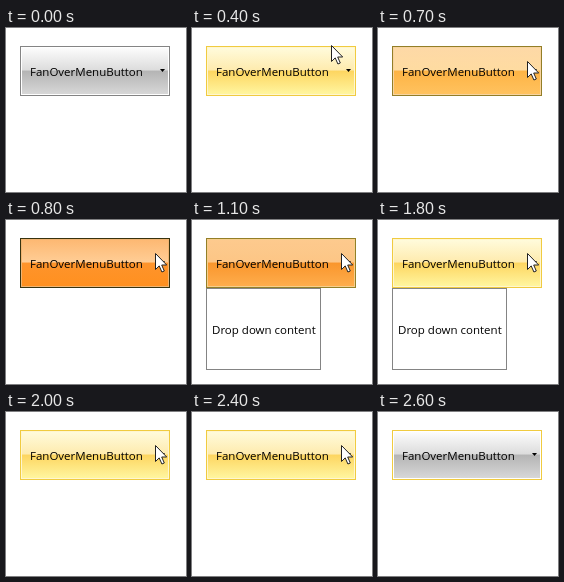
An HTML page for the animation above (3200 ms loop, 180 by 164 pixels).

```html
<!DOCTYPE html>
<html lang="en">
<head>
<meta charset="utf-8">
<title>Drop down button</title>
<style>
  html, body { margin: 0; width: 100%; height: 100%; overflow: hidden; background: #fff; }
  svg { display: block; }
  text { font: 11.5px "Open Sans", "Noto Sans", sans-serif; fill: #000; }
</style>
</head>
<body>
<svg width="180" height="164" viewBox="0 0 180 164">
  <defs id="defs"></defs>
  <g id="skins"></g>
  <rect id="frame" x="14.5" y="18.5" width="149" height="49" fill="none" stroke="#f0cb40"/>
  <text x="24" y="48">FanOverMenuButton</text>
  <path d="M154 41h5l-2.5 3z"/>
  <g id="popup">
    <rect x="14.5" y="68.5" width="114" height="81" fill="#fff" stroke="#848484"/>
    <text x="20" y="114">Drop down content</text>
  </g>
  <path id="cursor" d="M.5 .5V16.5L4.2 12.9 6.9 19 9.3 18 6.7 12H11.7Z" fill="#fff" stroke="#222"/>
</svg>
<script>
const LOOP = 3200, STEP = 100;
const $ = id => document.getElementById(id);

// A glossy face: two gradients that meet in a hard edge near the middle.
function addSkin(name, outer, inner, top, aboveEdge, belowEdge, bottom) {
  $("defs").innerHTML += `<linearGradient id="${name}Fill" x2="0" y2="1">
    <stop stop-color="${top}"/>
    <stop offset=".48" stop-color="${aboveEdge}"/>
    <stop offset=".5" stop-color="${belowEdge}"/>
    <stop offset="1" stop-color="${bottom}"/>
  </linearGradient>`;
  $("skins").innerHTML += `<g id="${name}">
    <rect x="14.5" y="18.5" width="149" height="49" fill="#fff" stroke="${outer}"/>
    <rect x="15.5" y="19.5" width="147" height="47" fill="url(#${name}Fill)" stroke="${inner}"/>
  </g>`;
}

addSkin("normal", "#848484", "#fff", "#fdfdfd", "#dcdcdc", "#b4b4b4", "#d8d8d8");
addSkin("hover", "#f0cb40", "#fff6cf", "#fffbdc", "#feebae", "#fdd560", "#fff6a0");
addSkin("pressed", "#38330f", "#f0b472", "#fdb872", "#ffcd95", "#fe942b", "#ff9020");
addSkin("open", "#f0cb40", "#fde9a6", "#fddcaa", "#fcc078", "#f7982c", "#fecb7c");

const ramp = (time, from, to) => Math.min(1, Math.max(0, (time - from) / (to - from)));
const pulse = (time, start, end, fadeIn = 100, fadeOut = 200) =>
  ramp(time, start, start + fadeIn) - ramp(time, end, end + fadeOut);

const opacity = {
  hover: time => pulse(time, 300, 2400),
  pressed: time => pulse(time, 600, 1100, 200, 100),
  open: time => pulse(time, 1000, 1600, 200),
  popup: time => pulse(time, 900, 1800),
  frame: time => ramp(time, 2300, 2400),
  cursor: time => pulse(time, 300, 2400, 100, 100)
};

const start = performance.now();

function draw() {
  const elapsed = Math.max(0, performance.now() - start) % LOOP;
  const time = Math.floor(elapsed / STEP) * STEP;
  for (const id in opacity) $(id).setAttribute("opacity", opacity[id](time));

  // The pointer swings out to the right on its way down.
  const move = ramp(time, 400, 600);
  const x = 139 + 10 * move + 11 * Math.sin(Math.PI * move);
  const y = 17 + 16 * move;
  $("cursor").setAttribute("transform", `translate(${x} ${y})`);
  requestAnimationFrame(draw);
}
draw();
</script>
</body>
</html>
```
